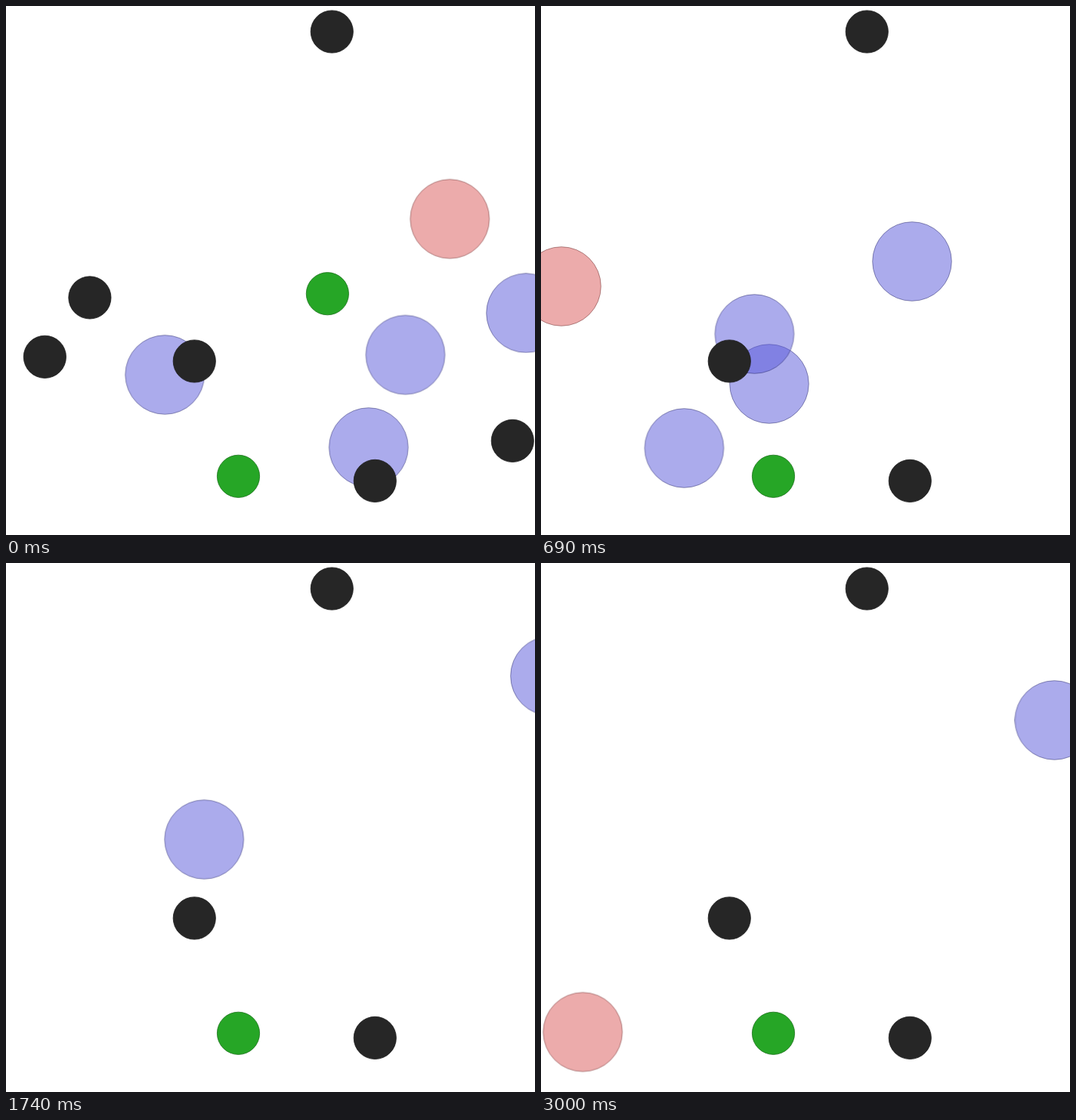
Animation, 700 px wide and 700 px high, one loop 3030 ms. Source, as an HTML page without scripts:

```html
<!DOCTYPE html>
<html lang="en">
<head>
<meta charset="utf-8">
<title>Pursuit</title>
<style>
  html, body { margin: 0; width: 100%; height: 100%; overflow: hidden; background: #fff; }
  svg { display: block; width: 100%; height: 100%; }

  /* Agents are translucent; landmarks are opaque and lie above them. */
  .agent { r: 52.3px; fill-opacity: .5; stroke-opacity: .5; stroke-width: 1; animation: 3030ms -2ms infinite; }
  .chaser { fill: #5959d9; stroke: #2d2d6d; }
  .runner { fill: #d95959; stroke: #6d2d2d; }
  .mark { r: 28.1px; stroke-width: .8; }
  .rock { fill: #262626; stroke: #1c1c1c; }
  .food { fill: #26a626; stroke: #1a701a; }
  .brief { animation: brief 3030ms -2ms infinite step-end; }

  .runner { animation-name: runner; }
  .a { animation-name: a; }
  .b { animation-name: b; }
  .c { animation-name: c; }
  .d { animation-name: d; }

  @keyframes brief {
    0% { visibility: visible; }
    .9901%, 100% { visibility: hidden; }
  }

  /* One step is 30 ms; each leg has as many steps as it lasts. */
  @keyframes runner {
    0% { transform: translate(587.3px, 281.7px); animation-timing-function: steps(8); }
    7.9208% { transform: translate(339px, 290px); animation-timing-function: steps(8); }
    15.8416% { transform: translate(138.7px, 320.6px); animation-timing-function: steps(7); }
    22.7723% { transform: translate(27px, 371px); animation-timing-function: steps(7); }
    29.7030% { transform: translate(-46.5px, 436.5px); animation-timing-function: steps(8); }
    37.6238% { transform: translate(-95px, 500px); animation-timing-function: steps(34); }
    71.2871% { transform: translate(-60px, 560px); animation-timing-function: steps(10); }
    81.1881% { transform: translate(38px, 592px); animation-timing-function: steps(4); }
    85.1485% { transform: translate(54px, 602px); animation-timing-function: steps(5); }
    90.0990% { transform: translate(61.5px, 610.7px); animation-timing-function: steps(4); }
    94.0594% { transform: translate(59.5px, 616px); animation-timing-function: steps(5); }
    99.0099%, 100% { transform: translate(55.3px, 620.6px); }
  }

  @keyframes a {
    0% { transform: translate(688px, 406.3px); animation-timing-function: steps(8); }
    7.9208% { transform: translate(482px, 405px); animation-timing-function: steps(8); }
    15.8416% { transform: translate(339.4px, 429px); animation-timing-function: steps(7); }
    22.7723% { transform: translate(302px, 500px); animation-timing-function: steps(7); }
    29.7030% { transform: translate(324px, 543px); animation-timing-function: steps(8); }
    37.6238% { transform: translate(407px, 453px); animation-timing-function: steps(8); }
    45.5446% { transform: translate(526.3px, 304.2px); animation-timing-function: steps(8); }
    53.4653% { transform: translate(658px, 151px); animation-timing-function: steps(4); }
    57.4257% { transform: translate(720px, 149.5px); animation-timing-function: steps(5); }
    62.3762%, 100% { transform: translate(790px, 150px); }
  }

  @keyframes b {
    0% { transform: translate(528.5px, 461.6px); animation-timing-function: steps(8); }
    7.9208% { transform: translate(398px, 474px); animation-timing-function: steps(8); }
    15.8416% { transform: translate(280.2px, 515.2px); animation-timing-function: steps(7); }
    22.7723% { transform: translate(189.5px, 585px); animation-timing-function: steps(7); }
    29.7030% { transform: translate(120.1px, 665.8px); animation-timing-function: steps(7); }
    36.6337% { transform: translate(98px, 722px); animation-timing-function: steps(7); }
    43.5644%, 100% { transform: translate(95px, 780px); }
  }

  @keyframes c {
    0% { transform: translate(479.8px, 584px); animation-timing-function: steps(8); }
    7.9208% { transform: translate(416px, 526px); animation-timing-function: steps(8); }
    15.8416% { transform: translate(350.6px, 474.2px); animation-timing-function: steps(7); }
    22.7723% { transform: translate(282.5px, 434px); animation-timing-function: steps(7); }
    29.7030% { transform: translate(227px, 406.2px); animation-timing-function: steps(8); }
    37.6238% { transform: translate(197px, 399px); animation-timing-function: steps(8); }
    45.5446% { transform: translate(191.7px, 396.7px); animation-timing-function: steps(8); }
    53.4653% { transform: translate(228px, 384px); animation-timing-function: steps(9); }
    62.3762% { transform: translate(305px, 343px); animation-timing-function: steps(9); }
    71.2871% { transform: translate(387.3px, 305.5px); animation-timing-function: steps(10); }
    81.1881% { transform: translate(489px, 252px); animation-timing-function: steps(9); }
    90.0990% { transform: translate(585.8px, 213.8px); animation-timing-function: steps(9); }
    99.0099%, 100% { transform: translate(679.4px, 208px); }
  }

  @keyframes d {
    0% { transform: translate(210.2px, 487.9px); animation-timing-function: steps(8); }
    7.9208% { transform: translate(317px, 447px); animation-timing-function: steps(8); }
    15.8416% { transform: translate(416.4px, 394.4px); animation-timing-function: steps(7); }
    22.7723% { transform: translate(491px, 338px); animation-timing-function: steps(7); }
    29.7030% { transform: translate(563.8px, 281px); animation-timing-function: steps(8); }
    37.6238% { transform: translate(661px, 232px); animation-timing-function: steps(8); }
    45.5446%, 100% { transform: translate(765px, 200px); }
  }
</style>
</head>
<body>
<svg viewBox="0 0 700 700">
  <circle class="agent chaser a" r="52.3"/>
  <circle class="agent chaser b" r="52.3"/>
  <circle class="agent chaser c" r="52.3"/>
  <circle class="agent chaser d" r="52.3"/>
  <circle class="agent runner" r="52.3"/>

  <circle class="mark rock" cx="431.3" cy="34" r="28.1"/>
  <circle class="mark rock" cx="249.3" cy="470" r="28.1"/>
  <circle class="mark rock" cx="488.3" cy="628.4" r="28.1"/>
  <circle class="mark food" cx="307.5" cy="622.3" r="28.1"/>

  <g class="brief">
    <circle class="mark rock" cx="110.9" cy="385.9" r="28.1"/>
    <circle class="mark rock" cx="51.4" cy="464.3" r="28.1"/>
    <circle class="mark rock" cx="670.3" cy="575.4" r="28.1"/>
    <circle class="mark food" cx="425.4" cy="380.7" r="28.1"/>
  </g>
</svg>
</body>
</html>
```
